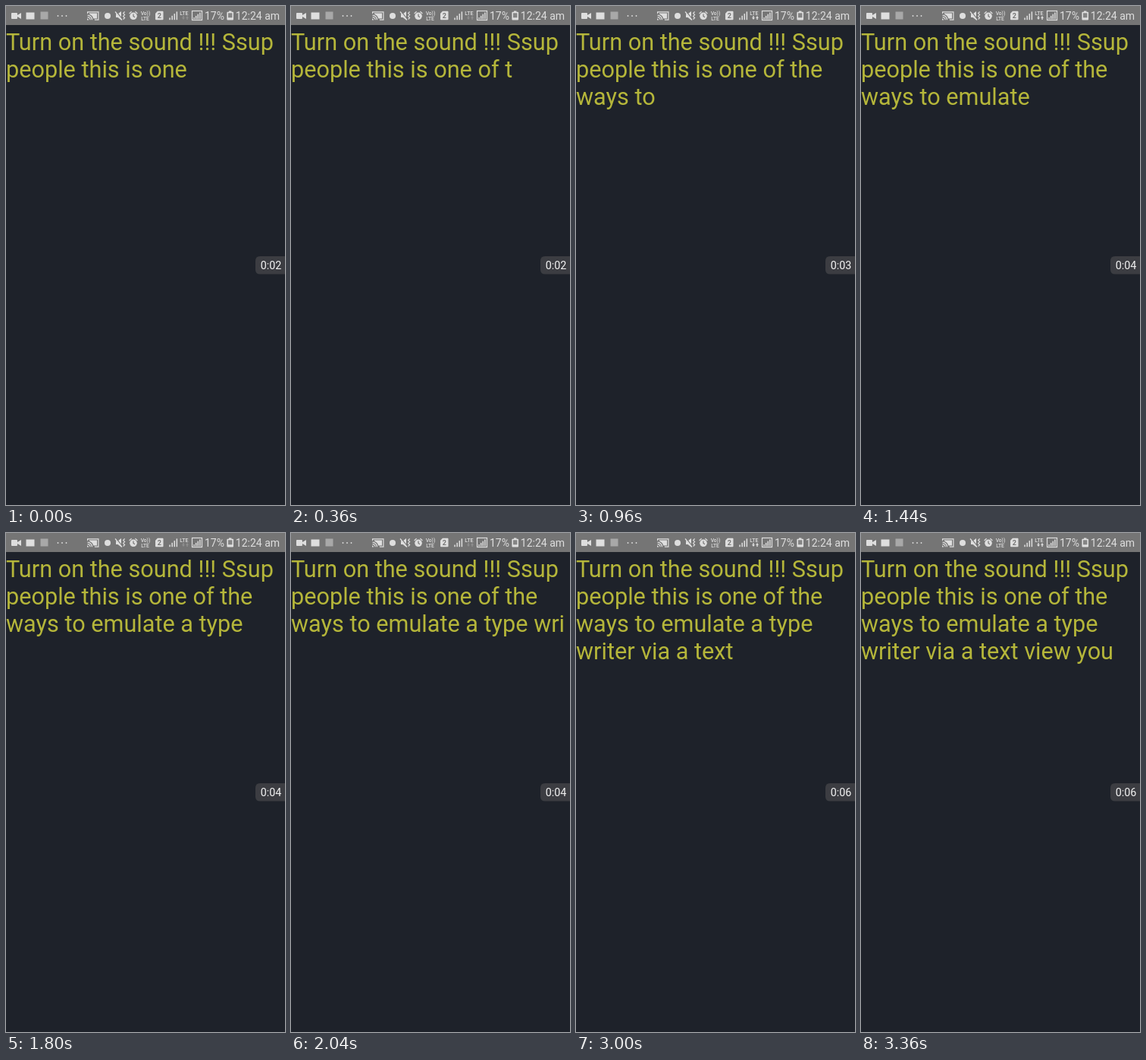
An HTML page that plays this animation: 368 by 656 pixels, repeating every 3480 ms.

```html
<!DOCTYPE html>
<html lang="en">
<head>
<meta charset="utf-8">
<title>Typewriter text</title>
<style>
  html, body { margin: 0; width: 100%; height: 100%; overflow: hidden; background: #1e222a; }
  svg { display: block; width: 368px; height: 656px; font-family: Roboto, sans-serif; }
  text { white-space: pre; }
  .line { fill: none; stroke: #dedede; stroke-width: 1.2; }
  .cut { fill: none; stroke: #757575; stroke-width: 1.2; }
</style>
</head>
<body>
<svg viewBox="0 0 368 656">
  <rect width="368" height="656" fill="#1e222a"/>
  <rect width="368" height="25" fill="#757575"/>

  <g fill="#dedede">
    <!-- notifications -->
    <path d="M8 9h6q1 0 1 1v2l5-3v8l-5-3v2q0 1-1 1H8q-1 0-1-1v-6q0-1 1-1z"/>
    <rect x="26.5" y="8.5" width="11" height="9"/>
    <rect x="45.5" y="7.5" width="10" height="10" fill="#a8a8a8"/>
    <circle cx="68.5" cy="13" r=".9"/><circle cx="74" cy="13" r=".9"/><circle cx="79.5" cy="13" r=".9"/>

    <!-- cast -->
    <path class="line" d="M107.6 10V7.8h14.3v10.4h-5M107.5 12.2a6 6 0 0 1 6 6M107.5 14.6a3.6 3.6 0 0 1 3.6 3.6"/>
    <path d="M110 9.5h10v7h-4.8a8 8 0 0 0-5.2-5.8zM107 16.5a2 2 0 0 1 2 2h-2z"/>
    <circle cx="134" cy="13" r="4"/>

    <!-- muted speaker, vibrating -->
    <path d="M145 10.5h2.5l4.5-3.5v11.5l-4.5-3.5H145z"/>
    <path class="cut" d="M145 7l9 11"/>
    <path class="line" d="M144 7.5l9 11M156.6 7.5l-2 2 2 2-2 2 2 2-2 2"/>

    <!-- alarm -->
    <circle cx="168" cy="13.3" r="4.8"/>
    <path class="line" d="M162.6 10l3-2.7M173.4 10l-3-2.7"/>
    <path class="cut" d="M168 10.5v3l2 1.3"/>

    <g font-size="6.6" font-weight="500">
      <text x="177.7" y="11.6">Vo))</text>
      <text x="178.2" y="18.6">LTE</text>
      <text x="229.2" y="11.6" font-size="7">LTE</text>
    </g>

    <!-- SIM slot -->
    <path d="M200 6.8h6.5q1 0 1 1v9.4q0 1-1 1H198q-1 0-1-1V9.8z"/>
    <text x="199.8" y="16.3" font-size="9" font-weight="700" fill="#757575">2</text>

    <g id="bars"></g>
    <rect class="line" x="245.5" y="6.5" width="13" height="12" stroke-width="1"/>
    <g id="arrows">
      <path d="M232 15.2h1.3V13h1.4v2.2h1.3l-2 2.8z"/>
      <path d="M237 15.8h1.3V18h1.4v-2.2h1.3l-2-2.8z"/>
    </g>

    <!-- battery -->
    <path d="M294 6.5h3.4v1.3h1.6q1 0 1 1v8.7q0 1-1 1h-6.6q-1 0-1-1V8.8q0-1 1-1H294z"/>
    <rect x="293" y="9.3" width="5.4" height="6" fill="#858585"/>

    <text x="262" y="18" font-size="14">17%</text>
    <text x="302.8" y="18" font-size="14">12:24 am</text>
  </g>

  <g id="typed" font-size="30.67" fill="#b5b63a"></g>

  <path d="M368 329h-33q-6 0-6 6v11.5q0 6 6 6h33z" fill="#3c3d42"/>
  <text id="timer" x="335.8" y="346" font-size="14.3" fill="#f2f2f2"></text>
</svg>
<script>
const LOOP = 3480, STEP = 120;
const MESSAGE = 'Turn on the sound !!! Ssup people this is one of the ways to emulate a type writer via a text view you';
// [step, characters typed]
const PACE = [[0, 45], [5, 54], [12, 68], [17, 79], [20, 85], [25, 93], [28, 102]];
// [line start, count at which its first word no longer fits above]
const BREAKS = [[27, 28], [53, 55], [76, 80]];

const get = id => document.getElementById(id);
function add(parent, tag, attrs) {
  const el = document.createElementNS('http://www.w3.org/2000/svg', tag);
  for (const key in attrs) el.setAttribute(key, attrs[key]);
  return parent.appendChild(el);
}

for (const [x, base, size] of [[215.3, 18.2, 2.7], [247.3, 17.3, 2.2]])
  for (let i = 0; i < 4; i++)
    add(get('bars'), 'rect', {
      x: x + i * (size + .4), y: base - size * (i + 1), width: 1.5, height: size * (i + 1)
    });

const lines = [0, 1, 2, 3].map(i => add(get('typed'), 'text', { x: 0, y: 57.8 + 36 * i }));

function typedCount(step) {
  const next = Math.max(1, PACE.findIndex(([s]) => s >= step));
  const [s0, n0] = PACE[next - 1], [s1, n1] = PACE[next];
  return Math.round(n0 + (n1 - n0) * (step - s0) / (s1 - s0));
}

function render(time) {
  const step = Math.floor(time % LOOP / STEP);
  const count = typedCount(step);
  const starts = [0, ...BREAKS.filter(([, fits]) => count >= fits).map(([start]) => start)];
  lines.forEach((line, i) => {
    line.textContent = i < starts.length ? MESSAGE.slice(starts[i], Math.min(count, starts[i + 1] ?? count)) : '';
  });
  get('timer').textContent = '0:0' + (2 + Math.floor((step + 3) / 7));
  const active = step >= 8 && step < 14 || step >= 19;
  get('arrows').setAttribute('opacity', active ? 1 : .25);
}

const begin = performance.now();
function tick() {
  render(performance.now() - begin);
  requestAnimationFrame(tick);
}
tick();
</script>
</body>
</html>
```
